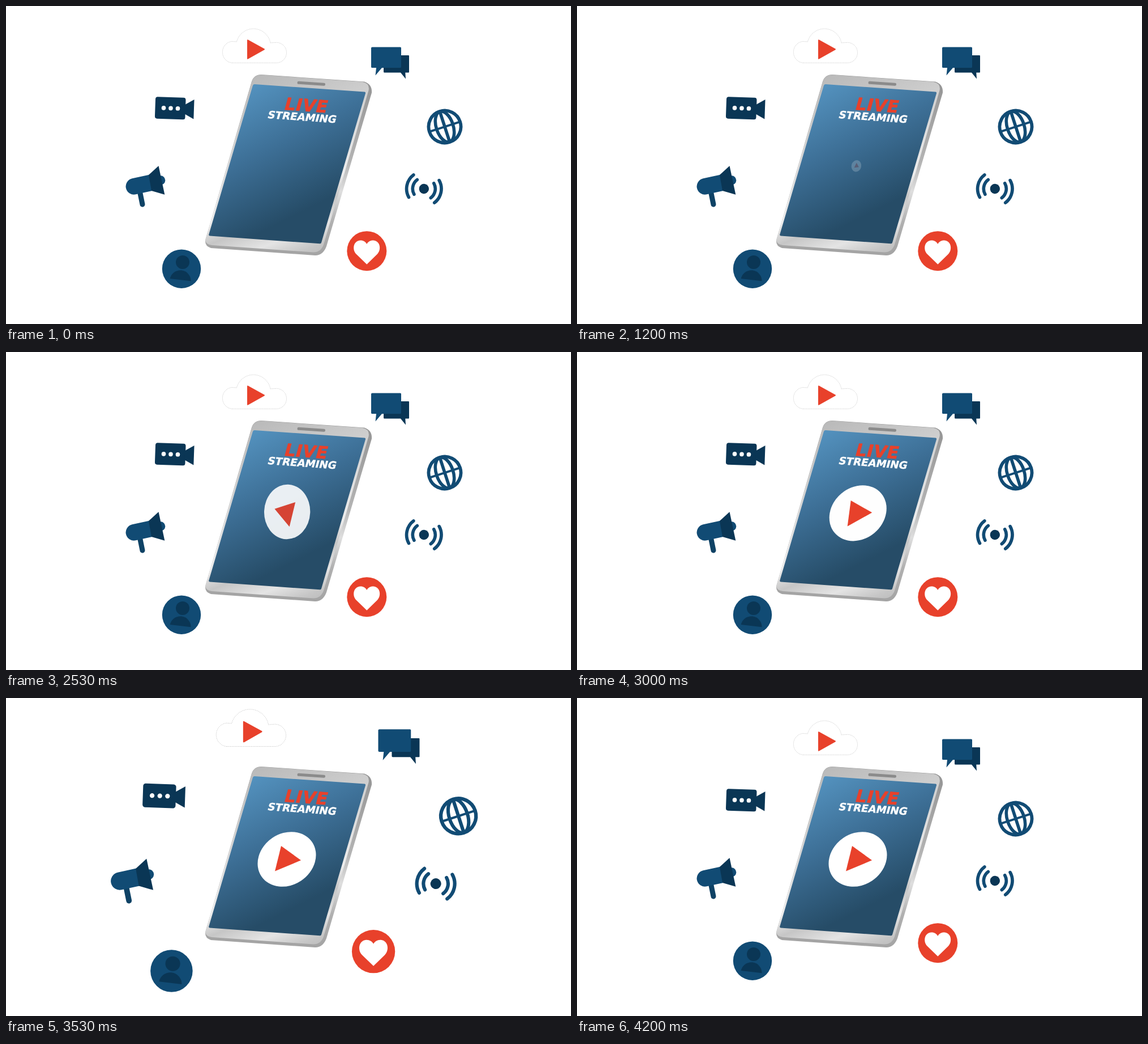
These frames come from a looping animation (998x561 px, 4.99 s). An HTML page:

```html
<!DOCTYPE html>
<html lang="en">
<head>
<meta charset="utf-8">
<title>Live streaming</title>
<style>
  html, body { margin: 0; width: 100%; height: 100%; overflow: hidden; background: #fff; }
  svg { display: block; width: 100%; height: 100%; }
  text { font-family: "DejaVu Sans", sans-serif; font-weight: 700; text-anchor: middle; }
  .red { fill: #e8412b; }
  .blue { fill: #114b74; }
  .navy { fill: #0a3655; }
  .white { fill: #fff; }
  .line { fill: none; stroke: #114b74; }
</style>
</head>
<body>
<svg viewBox="0 0 998 561">
  <defs>
    <linearGradient id="glass" gradientUnits="userSpaceOnUse" x1="402" y1="147" x2="513" y2="368">
      <stop offset="0" stop-color="#5594c1"/>
      <stop offset=".5" stop-color="#3d6f96"/>
      <stop offset="1" stop-color="#264c67"/>
    </linearGradient>
    <linearGradient id="metal" gradientUnits="userSpaceOnUse" x1="440" y1="120" x2="560" y2="440">
      <stop offset="0" stop-color="#b9b9b9"/>
      <stop offset=".2" stop-color="#c8c8c8"/>
      <stop offset=".64" stop-color="#ededed"/>
      <stop offset=".74" stop-color="#c6c6c6"/>
      <stop offset=".85" stop-color="#e4e4e4"/>
      <stop offset=".94" stop-color="#c6c6c6"/>
      <stop offset="1" stop-color="#bababa"/>
    </linearGradient>
    <linearGradient id="side" gradientUnits="userSpaceOnUse" x1="640" y1="140" x2="555" y2="440">
      <stop offset="0" stop-color="#969696"/>
      <stop offset=".45" stop-color="#b4b4b4"/>
      <stop offset=".62" stop-color="#dedede"/>
      <stop offset=".8" stop-color="#b0b0b0"/>
      <stop offset="1" stop-color="#a4a4a4"/>
    </linearGradient>
  </defs>

  <!-- tablet -->
  <path fill="url(#side)" d="M451 121L633 133.5Q647 138 646 153L566 424Q560 440 546 440L362 427Q349 423 353 410L434 133Q438 121 451 121Z"/>
  <path fill="url(#metal)" d="M451 121.5L629 133.7Q643 136 640.5 149L561 421Q556 434.5 543 434.5L364 422Q349 420 353 409L434 134Q438 121.5 451 121.5Z"/>
  <path fill="url(#glass)" d="M439 138L633.5 151.6Q635.5 152 635 154L557 417.5Q556.5 419.5 554.5 419.3L360 405.5Q357.8 405 358.3 403L436 140Q437 138 439 138Z"/>
  <path fill="none" stroke="#8b8b8b" stroke-width="5" stroke-linecap="round" d="M517 135.3L561.5 138.3"/>
  <text class="red" stroke="#e8412b" stroke-width=".7" font-size="30" letter-spacing=".6" transform="matrix(1 .07 -.27 .98 528 185.5)">LIVE</text>
  <text class="white" stroke="#fff" stroke-width=".4" font-size="18.2" transform="matrix(1 .07 -.27 .98 521.5 202)">STREAMING</text>

  <!-- play button -->
  <g id="play">
    <ellipse class="white" rx="54" ry="45.5" transform="translate(496 284.5) rotate(-34)"/>
    <path class="red" d="M486 261L521 286.3L475 305.5Z"/>
  </g>

  <g id="icons">
    <!-- cloud -->
    <path fill="#fff" stroke="#aaa" stroke-width=".8" stroke-dasharray="1 1.6" d="M399 100.3A18.5 19 0 0 1 399 62.5L407.5 63A30.5 30.5 0 0 1 467 65L477.5 64.3A18 18 0 0 1 477.5 100.3Z"/>
    <path class="red" stroke="#e8412b" stroke-width="2" stroke-linejoin="round" d="M427 60.3L456 76.3L427 92.7Z"/>

    <!-- chat -->
    <path class="navy" d="M668.5 87H711Q712 87 712 88V116.5Q712 117.5 711 117.5H705.3L706 128.5L697 117.5H668.5Q667 117.5 667 116V88Q667 87 668.5 87Z"/>
    <path class="blue" d="M647 72.5H696.5Q698 72.5 698 74V107.5Q698 109 696.5 109H664L652.5 122.5L654 109H647Q645 109 645 107.5V74Q645 72.5 647 72.5Z"/>

    <!-- camera -->
    <g transform="rotate(2 290 180)">
      <rect class="navy" x="263.5" y="161" width="53.5" height="38.5" rx="4"/>
      <path class="navy" d="M316 173L332 163.5V198L316 189.5Z"/>
      <g class="white">
        <circle cx="278.5" cy="180.3" r="3.8"/>
        <circle cx="291" cy="180.3" r="3.8"/>
        <circle cx="303.5" cy="180.3" r="3.8"/>
      </g>
    </g>

    <!-- megaphone -->
    <path fill="none" stroke="#0e4265" stroke-width="9" stroke-linecap="round" d="M236.5 328L241 350"/>
    <circle class="blue" cx="273" cy="307.5" r="8.3"/>
    <path class="blue" d="M222.7 304.2L254 297.5L258 326L229.3 332.3A14.3 14.3 0 0 1 222.7 304.2Z"/>
    <path class="navy" d="M252 298L269.5 282L280.3 332.8L257 326Z"/>

    <!-- globe -->
    <g class="line" stroke-width="5.6" transform="translate(775 213) rotate(-18)">
      <circle r="28.5" stroke-width="5.8"/>
      <ellipse rx="15" ry="28"/>
      <path d="M0-28V28"/>
      <path stroke-width="3.8" d="M-28 0H28"/>
    </g>

    <!-- broadcast -->
    <g transform="translate(738.3 322.5) rotate(12)">
      <circle class="navy" r="8.7"/>
      <g id="waves" class="line" stroke-width="5.7" stroke-linecap="round"/>
    </g>

    <!-- heart -->
    <circle class="red" cx="637.3" cy="432.2" r="35"/>
    <path class="white" d="M637.3 455.7L619 438C611 430 613.5 415.5 624 413.7C630 412.7 635 415.5 637.3 420C639.6 415.5 644.6 412.7 650.6 413.7C661 415.5 663.5 430 655.5 438Z"/>

    <!-- user -->
    <circle class="blue" cx="310" cy="463.7" r="34.2"/>
    <circle class="navy" cx="312" cy="452" r="12"/>
    <path class="navy" d="M289.7 481A18.6 18.6 0 0 1 326.5 485.3Z"/>
  </g>
</svg>
<script>
  const LOOP = 4990, TICK = 200 / 3;
  const get = id => document.getElementById(id);
  const play = get('play'), icons = get('icons');

  const wave = (r, side) => {
    const a = 41 * Math.PI / 180, x = side * r * Math.cos(a), y = r * Math.sin(a);
    return `M${x} ${-y}A${r} ${r} 0 0 ${side > 0 ? 1 : 0} ${x} ${y}`;
  };
  get('waves').innerHTML =
    `<path d="${wave(20, -1) + wave(20, 1) + wave(30.7, -1) + wave(30.7, 1)}"/>`;

  const about = (x, y, moves) => `translate(${x} ${y}) ${moves} translate(${-x} ${-y})`;

  function draw(t) {
    // Movement advances at 15 steps per second.
    const step = Math.max(0, Math.floor((t - 729.3) / TICK));

    const x = Math.min(1, step / 35), left = 1 - x;
    const size = x * (.68 + x * (1.63 - 1.31 * x));
    const turn = -left * (218 + 74 * left);
    play.setAttribute('transform', about(494, 282.3, `rotate(${turn}) scale(${size})`));
    play.setAttribute('opacity', size);

    // Icons swell, then snap back.
    const n = step - 37;
    const swell = n > 0 && n < 8 ? n * (.0128 + .00103 * n) : 0;
    icons.setAttribute('transform', about(506, 265.5, `scale(${1 + swell})`));
  }

  const start = performance.now();
  function loop() {
    draw((performance.now() - start) % LOOP);
    requestAnimationFrame(loop);
  }
  loop();
</script>
</body>
</html>
```
